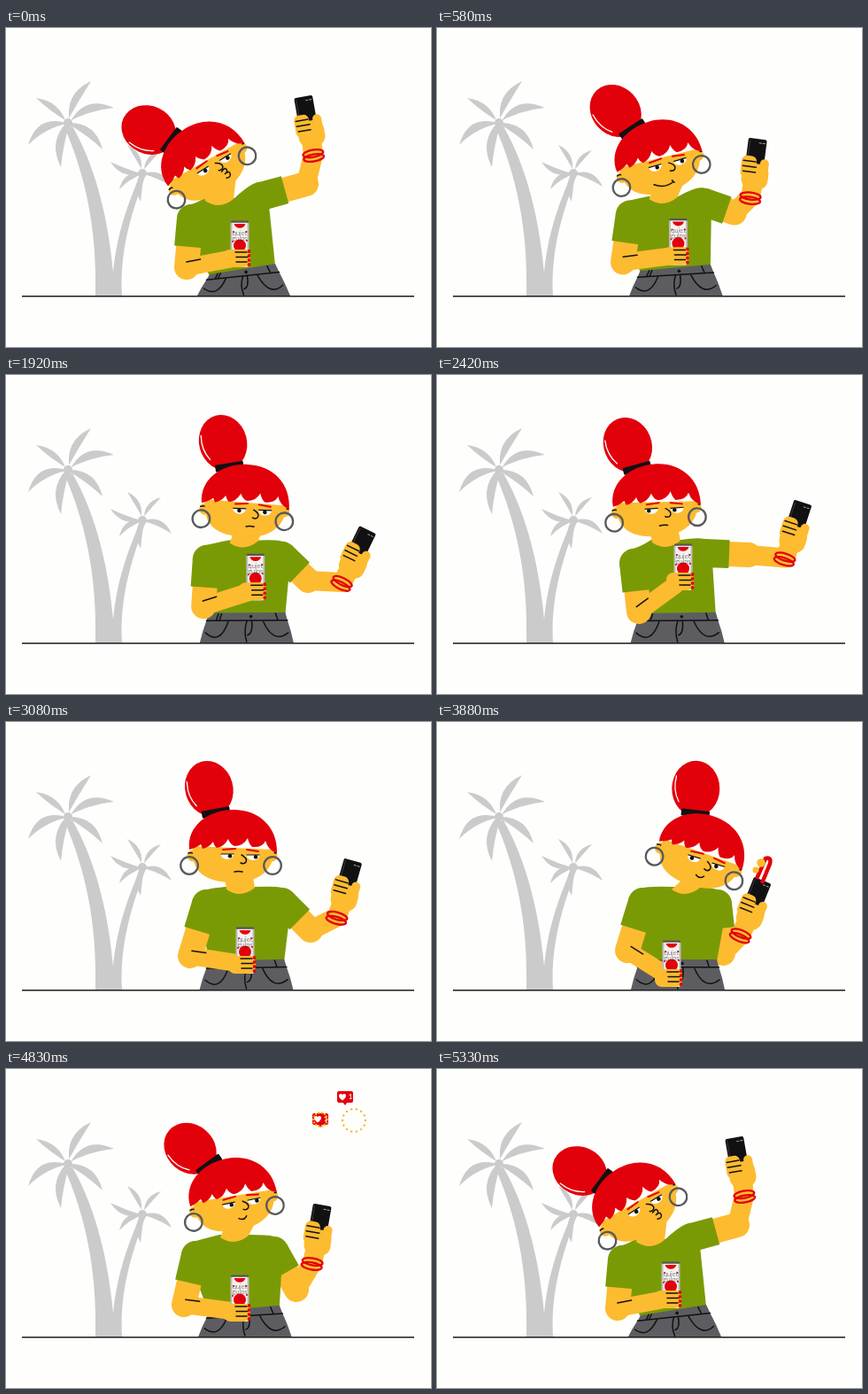
Recreate the animation shown at these times as an HTML page. Size 480 px wide and 360 px high, loop 5370 ms.

```html
<!DOCTYPE html>
<html lang="en">
<head>
<meta charset="utf-8">
<title>Selfie</title>
<style>
html, body { margin: 0; width: 100%; height: 100%; overflow: hidden; background: #fefefd; }
svg { display: block; width: 480px; height: 360px; }
.line { fill: none; stroke: #111; stroke-width: 1.5; stroke-linecap: round; stroke-linejoin: round; }
.can { font: 300 7.6px Lato, "Open Sans", sans-serif; fill: #333; text-anchor: middle; }
.count { font: 700 7px Lato, Arial, sans-serif; fill: #fff; }
</style>
</head>
<body>
<svg viewBox="0 0 480 360">
  <g id="palms" fill="#cbcbcb">
    <path d="M66 112C89 165 103 225 101 302H131C128 250 143 205 157 168L151 167C135 205 125 235 121 276C116 220 103 160 75 111Z"/>
  </g>
  <g id="actor"></g>
  <path d="M18 302.8H461" stroke="#1c1c1c" stroke-width="1.6"/>
  <g id="likes"></g>
</svg>
<script>
const LOOP = 5370;
const SKIN = '#fdbb30', RED = '#e2000b', GREEN = '#7a9a05', GRAY = '#5d5d61', DOT = '#f4b62c';
const $ = id => document.getElementById(id);

// Poses: earring midpoint + head tilt + bun angle, neck, waist lean, gaze,
// then shoulder/elbow/hand for each arm and the phone angle.
const pose = (head, neck, left, right, phone, lean, look) =>
  [...head, ...neck, ...left, ...right, phone, lean, look];
const selfie = pose([232.5, 169, -31.7, -65], [241, 196], [209, 215, 204, 270, 262, 259], [288, 190, 339, 176, 342, 114], -10, 1, 2);
const smile = pose([285, 164, 7, -9], [277, 191], [231, 204, 219, 256, 283, 253], [320, 206, 331, 257, 381, 233], 33, 0, 2);
const tap = pose([284, 163, 5, -12], [277, 191], [231, 204, 219, 256, 283, 253], [320, 206, 330, 256, 376, 232], 30, 0, 1);
const reach = pose([247, 163.5, -4, -22], [259, 190], [222, 212, 228, 267, 276, 232], [302, 201, 352, 203, 402, 179], 18, .1, -3);
const bend = pose([254, 162, 0, -16], [265, 190], [226, 205, 208, 264, 268, 273], [312, 203, 344, 235, 382, 192], 16, .15, 3);
const close = pose([290.5, 165.5, 17, 1], [281, 190], [232, 203, 215, 258, 263, 288], [317, 205, 323, 261, 354, 213], 22, 0, -2);
const lean = pose([258, 163.5, -11.5, -49], [258, 191], [214, 210, 201, 266, 262, 274], [303, 205, 328, 249, 351, 190], 10, .6, 3);
const keys = [[0, selfie], [290, selfie], [960, smile], [1030, smile], [1320, tap], [1640, smile],
  [2230, reach], [2690, reach], [3080, bend], [3410, close], [4440, close], [4830, lean], [5070, selfie], [LOOP, selfie]];

const clamp = v => Math.max(0, Math.min(1, v));
const mix = (a, b, k) => a + (b - a) * k;
const easeOut = k => 1 - (1 - clamp(k)) ** 3;

// Monotone cubic interpolation: holds stay flat, passing poses keep their speed.
function poseAt(t) {
  let i = 0;
  while (i < keys.length - 2 && t >= keys[i + 1][0]) i++;
  const slope = (j, n) => keys[j] && keys[j + 1]
    ? (keys[j + 1][1][n] - keys[j][1][n]) / (keys[j + 1][0] - keys[j][0]) : 0;
  const tangent = (j, n) => {
    const a = slope(j - 1, n), b = slope(j, n);
    return a * b > 0 ? 2 * a * b / (a + b) : 0;
  };
  const [t0, p0] = keys[i], [t1, p1] = keys[i + 1], d = t1 - t0, u = (t - t0) / d;
  return p0.map((v, n) => {
    const s = u * u * (3 - 2 * u);
    return mix(v, p1[n], s) + d * u * (1 - u) * ((1 - u) * tangent(i, n) - u * tangent(i + 1, n));
  });
}

const path = (d, attrs) => `<path d="${d}" ${attrs}/>`;
const fill = (d, color) => path(d, `fill="${color}"`);
const ink = d => path(d, 'class="line"');
const limb = (points, color, width, cap = 'round') =>
  path('M' + points.map(p => p.join()).join('L'), `fill="none" stroke="${color}" stroke-width="${width}" stroke-linecap="${cap}" stroke-linejoin="round"`);
const disc = (x, y, r, color) => `<circle cx="${x}" cy="${y}" r="${r}" fill="${color}"/>`;
const box = (x, y, w, h, r, color) => `<rect x="${x}" y="${y}" width="${w}" height="${h}" rx="${r}" fill="${color}"/>`;
const place = (x, y, angle, body) => `<g transform="translate(${x} ${y}) rotate(${angle})">${body}</g>`;

function toward([x, y], [a, b], length) {
  const d = Math.hypot(a - x, b - y);
  return [x + (a - x) * length / d, y + (b - y) * length / d];
}
function turned([x, y], angle, [dx, dy]) {
  const a = angle * Math.PI / 180, c = Math.cos(a), s = Math.sin(a);
  return [x + dx * c - dy * s, y + dx * s + dy * c];
}

function sleeve(shoulder, elbow, length) {
  return disc(...shoulder, 16, GREEN) + limb([shoulder, toward(shoulder, elbow, length)], GREEN, 32, 'butt');
}

function pants(k) {
  const at = (u, v) => {
    const x = mix(mix(229 + k, 316 - 12 * k, u), mix(219 - 3 * k, 325 - 4 * k, u), v);
    return [x, mix(mix(268 + 10 * k, 268 - 2 * k, u), 302, v)].map(n => n.toFixed(1)).join();
  };
  return fill(`M${at(0, 0)}L${at(1, 0)}L${at(1, .25)}Q${at(1.01, .6)} ${at(1, 1)}L${at(0, 1)}Q${at(-.01, .6)} ${at(0, .25)}Z`, GRAY) +
    ink(`M${at(0, .26)}L${at(1, .26)}M${at(.13, .03)}L${at(.12, .24)}M${at(.17, .03)}L${at(.16, .24)}M${at(.87, .03)}L${at(.88, .24)}`) +
    ink(`M${at(.03, .67)}Q${at(.22, 1.1)} ${at(.27, .3)}M${at(.97, .67)}Q${at(.78, 1.05)} ${at(.7, .3)}`) +
    ink(`M${at(.5, .28)}Q${at(.46, .6)} ${at(.5, .97)}M${at(.56, .28)}Q${at(.57, .7)} ${at(.51, .75)}`) +
    disc(...at(.55, .13).split(','), 1.8, '#111');
}

function mouth(t) {
  if (t < 480 || t > 4930) return ink('M13 0q6-3 6 1q0 3-4 3q6-1 5 3q-1 4-6 2');
  if (t < 1900) return ink('M-11 7Q0 15 11 10M10 8l2 3');
  if (t < 3220) return ink('M4 7Q8 6 13 7');
  return ink('M4 6Q9 10 13 5');
}

function eye(x, y, look, open) {
  return `<g transform="translate(${x} ${y}) scale(1 ${open})">` +
    fill('M-7.5 0H7.5A7.5 6 0 0 1-7.5 0Z', '#fff') + disc(look, 2.3, 2.3, '#111') + '</g>' +
    path(`M${x - 7.5} ${y}h15`, 'stroke="#111" stroke-width="1.2"');
}

function head(t, x, y, tilt, bunAngle, look) {
  const blink = Math.max(clamp(1 - Math.abs(t - 720) / 70), clamp(1 - Math.abs(t - 1420) / 70), clamp(1 - Math.abs(t - 3260) / 70));
  const open = 1 - blink * .95;
  const ears = disc(-43, -11, 6.5, SKIN) + disc(46, -11, 6.5, SKIN) +
    ink('M-48-14q6-2 8 4M51-14q-6-2-8 4');
  const face = fill('M-43-22C-46 8-28 18 0 19C28 20 48 8 49-18Z', SKIN);
  const rings = [-47, 47].map(cx => `<circle cx="${cx}" cy="0" r="9.8" fill="none" stroke="#58595d" stroke-width="2.3"/>`).join('');
  const bun = place(-17, -60, bunAngle - tilt,
    '<ellipse cy="-28" rx="27" ry="31.5" fill="' + RED + '"/>' +
    path('M-22-42Q-26-26-19-13', 'fill="none" stroke="#fff" stroke-width="1.3" stroke-linecap="round"'));
  const tie = place(-17, -60, (bunAngle - tilt) * .65, box(-16, -4, 32, 8, 1, '#111'));
  const hair = fill('M-47-18C-50-45-25-63 3-63C32-63 53-43 52-14Q42-17 39-28Q36-20 24-21Q20-25 19-31Q14-22 4-22Q-1-24-3-30Q-8-21-16-20Q-19-22-20-27Q-25-20-32-19L-34-24Q-39-20-47-18Z', RED);
  const brows = path('M-9-18L5-19M18-18L31-16', `stroke="${RED}" stroke-width="2" stroke-linecap="round"`);
  return place(x, y, tilt, bun + ears + face + tie + hair + eye(-4, -13, look, open) + eye(25, -12, look, open) +
    brows + ink('M12-12Q19-8 17-4Q15-1 11-3') + mouth(t) + rings);
}

function can(x, y) {
  return place(x, y, 0, box(-10.5, -25, 21, 51, 2, '#bcbcbc') + box(-8.5, -25, 17, 51, 1, '#f5f3f1') +
    box(-10, -26.5, 20, 2.2, 1, '#555') +
    fill('M-6.5-23H6.5A6.8 6.8 0 0 1-6.5-23Z', RED) + disc(0, 1.5, 7, RED) + disc(0, 20, 5.5, RED) +
    [[-7, -14], [7.5, -14], [-8, -3], [8, -4], [-7, 11], [7, 11]].map(p => disc(...p, 1, RED)).join('') +
    '<text class="can" y="-10.5">quiet</text><text class="can" y="-4.5">gulps</text>');
}

function canHand(x, y) {
  return place(x, y, 0, box(-17, -9, 31, 20, 8, SKIN) + box(-4, -9, 17, 18, 4, SKIN) +
    ink('M-3-6H10M-2-.5H11M-2 5H10') +
    [-7, -2, 3, 8].map(dy => `<ellipse cx="12.5" cy="${dy}" rx="1.8" ry="2" fill="${RED}"/>`).join(''));
}

function phoneHand(x, y, angle) {
  const phone = box(-10.5, -37, 21, 44, 2, '#111') +
    path('M-8.5-35V-8', 'stroke="#3a3a3a" stroke-width="1"') +
    path('M2-32.5h3m1 0h3', 'stroke="#aaa" stroke-width="1"');
  const band = dy => `<ellipse cy="${dy}" rx="11.5" ry="4" fill="none" stroke="${RED}" stroke-width="2.3"/>`;
  return place(x, y, angle, phone + box(-15, -17, 17, 25, 6, SKIN) + box(-13, -9, 30, 29, 11, SKIN) + box(6, -15, 10, 26, 5, SKIN) +
    ink('M-13-11H1M-13-5H2M-12 1H2') + band(28) + band(33));
}

function drawActor(t) {
  const [ex, ey, tilt, bun, nx, ny, ...p] = poseAt(t);
  const [ls, le, lh, rs, re, rh] = [0, 2, 4, 6, 8, 10].map(i => [p[i], p[i + 1]]);
  const [angle, k, look] = p.slice(12);
  const wrist = turned(rh, angle, [0, 29]);
  const neckTop = turned([ex, ey], tilt, [8, 8]);

  const rightArm = limb([rs, re], SKIN, 28) + limb([re, wrist, turned(rh, angle, [1, 10])], SKIN, 22) + sleeve(rs, re, 28);
  const torso = fill(`M${229 + k} ${270 + 10 * k}L${ls[0] - 6} ${ls[1] + 10}L${ls[0] - 4} ${ls[1] - 15}Q${ls[0] + 8} ${ls[1] - 18} ${nx - 17} ${ny - 4}` +
    `L${nx + 17} ${ny - 4}Q${rs[0] - 8} ${rs[1] - 18} ${rs[0]} ${rs[1] - 16}L${rs[0] + 9} ${rs[1] + 10}L${316 - 12 * k} ${270 - 2 * k}Z`, GREEN);
  const neck = fill(`M${neckTop[0] - 16} ${neckTop[1]}L${neckTop[0] + 16} ${neckTop[1]}L${nx + 16} ${ny - 3}Q${nx} ${ny + 10} ${nx - 16} ${ny - 1}Z`, SKIN);
  const fold = Math.atan2(lh[1] - le[1], lh[0] - le[0]) * 180 / Math.PI;
  const leftArm = limb([ls, le], SKIN, 28) + limb([le, toward(lh, le, 8)], SKIN, 20) + sleeve(ls, le, 32) +
    place(...le, fold, ink('M1-6H17'));

  $('actor').innerHTML = rightArm + torso + pants(k) + phoneHand(...rh, angle) + neck + head(t, ex, ey, tilt, bun, look) +
    leftArm + can(lh[0] + 2, lh[1] - 15) + canHand(...lh);
}

const badges = [
  { born: 3960, x: 383, y: 32, pop: 4960 },
  { born: 4080, x: 355, y: 57, pop: 4790 },
  { born: 3920, x: 393, y: 58, pop: 4690 },
  { born: 4180, x: 404, y: 15, pop: 4470 }
];

function badge(t, { born, x, y, pop }) {
  if (t < born || t > pop + 210) return '';
  const rise = easeOut((t - born) / 320), burst = clamp((t - pop) / 170);
  const px = mix(368, x, rise), py = mix(176, y, rise);
  let body = '';
  if (burst < .45) {
    body = `<g transform="scale(${mix(.3, 1, rise)})">` + box(-9, -7, 18, 13, 2, RED) + fill('M-3 5H3L0 9Z', RED) +
      fill('M-3 3.5C-11-2-5-6-3-2.8C-1-6 5-2 -3 3.5Z', '#fff') + '<text class="count" x="4" y="2">1</text></g>';
  }
  if (burst > 0) {
    const r = mix(1, 13, easeOut(burst));
    for (let i = 0; i < 14; i++) {
      const a = i * Math.PI / 7;
      body += disc(r * Math.cos(a), r * Math.sin(a), t > pop + 170 ? .7 : 1.2, DOT);
    }
  }
  return place(px, py, 0, body);
}

function ribbon(t) {
  const grow = clamp((t - 3790) / 90), fade = clamp((t - 3900) / 120);
  if (grow <= 0 || fade >= 1) return '';
  const dash = `pathLength="1" stroke-dasharray="0 ${fade} ${Math.max(0, grow - fade)} 2"`;
  const dots = grow > .6 && fade < .5 ? disc(366, 159, 4.8, SKIN) + disc(360, 167, 3.6, SKIN) : '';
  return path('M367 182L376 160Q378 152 371 154L361 177', `fill="none" stroke="${RED}" stroke-width="4.5" ${dash}`) + dots;
}

function frond(x, y, tx, ty, bend) {
  const dx = tx - x, dy = ty - y, mx = x + dx * .5, my = y + dy * .5;
  const ctrl = b => `${mx - dy * b} ${my + dx * b}`;
  return fill(`M${x - 2} ${y}Q${ctrl(bend + .17)} ${tx} ${ty}Q${ctrl(bend - .17)} ${x + 2} ${y}Z`, '#cbcbcb');
}
const crown = (x, y, tips) => disc(x, y, 5, '#cbcbcb') + tips.map(tip => frond(x, y, ...tip)).join('');
$('palms').innerHTML +=
  crown(70, 107, [[96, 60, -.2], [34, 79, .12], [122, 90, -.28], [25, 132, .32], [109, 137, -.22], [62, 157, .2]]) +
  crown(154, 164, [[137, 132, .2], [118, 151, -.22], [175, 138, -.2], [128, 182, .28], [187, 179, -.25], [152, 196, .15]].map(([x, y, b]) => [x, y, b]));

function draw(now) {
  const t = now % LOOP;
  drawActor(t);
  $('likes').innerHTML = ribbon(t) + badges.map(b => badge(t, b)).join('');
  requestAnimationFrame(draw);
}
const start = performance.now();
draw(0);
function tick() { return performance.now() - start; }
</script>
</body>
</html>
```
